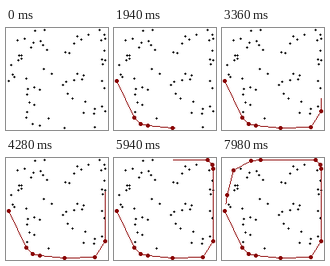
A matplotlib script for the animation above (8 s loop, 128 by 128 pixels).

```python
import numpy as np
import matplotlib.pyplot as plt
from matplotlib.animation import FuncAnimation

SIZE = 128
FRAMES = 400
STEP_MS = 20
RED = (139, 0, 0)

# Corners of the convex hull, in the order they are wrapped
HULL = [(3, 66), (25, 112), (33, 120), (42, 122), (73, 125), (111, 124),
        (124, 104), (124, 13), (123, 8), (117, 2), (48, 2), (36, 3),
        (14, 15), (6, 46), (3, 66)]

INNER = [(23, 13), (43, 16), (34, 18), (46, 21), (51, 27), (31, 24),
         (16, 34), (19, 34), (19, 38), (15, 40), (6, 46), (8, 58), (10, 61),
         (47, 51), (57, 57), (25, 63), (35, 74), (27, 76), (42, 77),
         (26, 83), (29, 93), (35, 96), (26, 105), (53, 113), (71, 71),
         (75, 67), (85, 65), (89, 57), (97, 59), (95, 64), (77, 82),
         (83, 88), (99, 92), (97, 106), (111, 101), (110, 107), (120, 98),
         (123, 75), (120, 66), (124, 40), (120, 39), (121, 45), (123, 28),
         (119, 15), (103, 8), (89, 10), (94, 14), (85, 19), (74, 30),
         (79, 31)]


def stamp(img, x, y, radius, color):
    """Fill a small disc; radius 1 gives a plus sign."""
    for dy in range(-radius, radius + 1):
        for dx in range(-radius, radius + 1):
            if abs(dx) + abs(dy) < radius * 2 or radius * (dx * dy == 0) == 1:
                if 0 <= x + dx < SIZE and 0 <= y + dy < SIZE:
                    img[y + dy, x + dx] = color


def trace(corners):
    """Walk the outline one pixel per step; also note the corner arrivals."""
    path, arrivals = [corners[0]], [0]
    for (x0, y0), (x1, y1) in zip(corners, corners[1:]):
        n = max(abs(x1 - x0), abs(y1 - y0))
        for i in range(1, n + 1):
            path.append((int(np.floor(x0 + (x1 - x0) * i / n + 0.5)),
                         int(np.floor(y0 + (y1 - y0) * i / n + 0.5))))
        arrivals.append(len(path) - 1)
    return path, arrivals


PATH, ARRIVALS = trace(HULL)

base = np.full((SIZE, SIZE, 3), 255, dtype=np.uint8)
for px, py in INNER + HULL:
    stamp(base, px, py, 1, (0, 0, 0))


def render(step):
    img = base.copy()
    if step > 0:
        for x, y in PATH[:step + 1]:
            img[y, x] = RED
    for (x, y), arrival in zip(HULL, ARRIVALS):
        if step > arrival:
            stamp(img, x, y, 2, RED)
    return img


fig = plt.figure(figsize=(SIZE / 100, SIZE / 100), dpi=100, facecolor="white")
ax = fig.add_axes([0, 0, 1, 1])
ax.axis("off")
view = ax.imshow(base, interpolation="nearest", aspect="auto")


def update(step):
    view.set_data(render(step))
    return (view,)


anim = FuncAnimation(fig, update, frames=FRAMES, interval=STEP_MS,
                     repeat=True, repeat_delay=0, blit=False)
plt.show()
```
